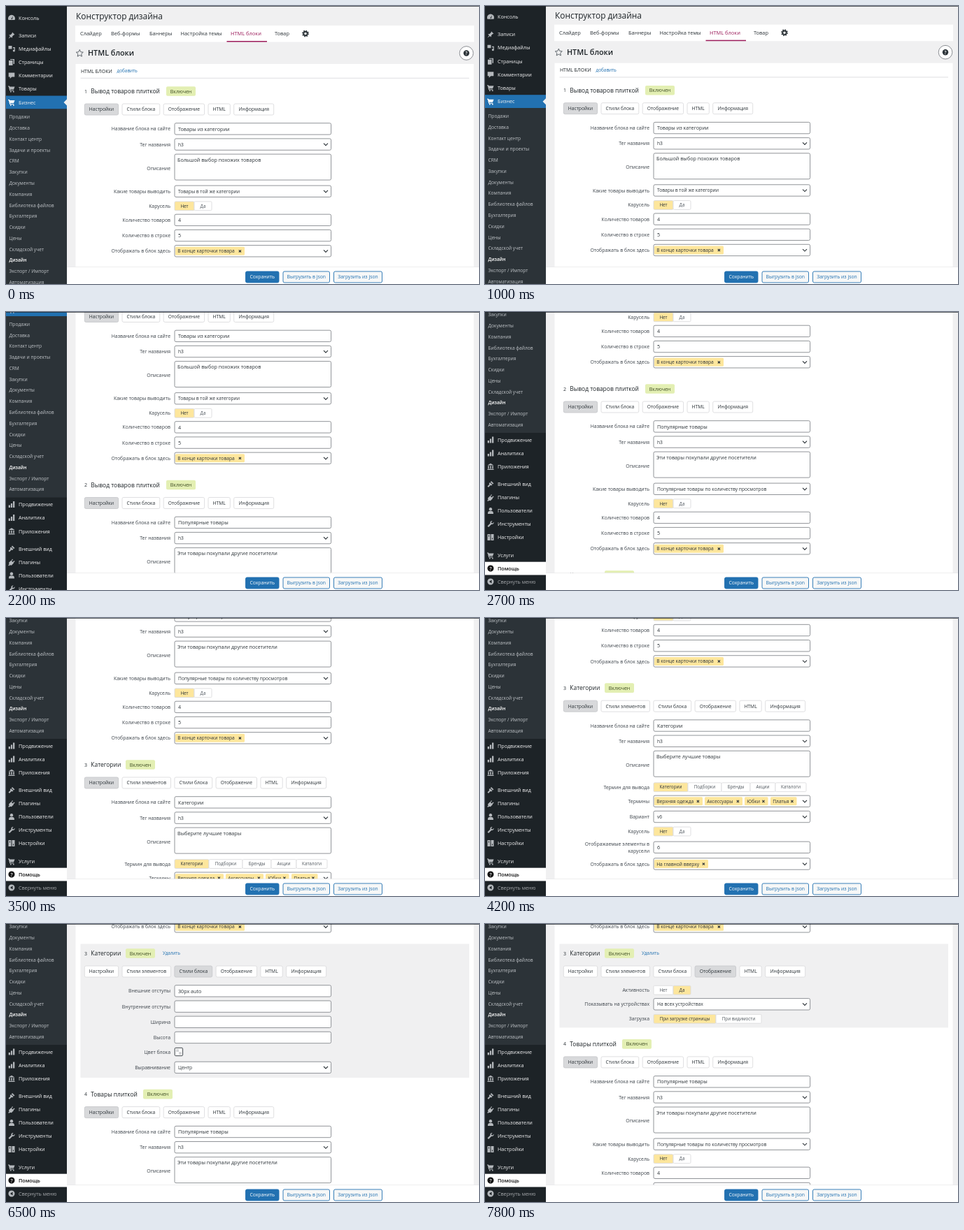
Recreate the animation shown at these times as an HTML page. Size 676x398 px, loop 8 s.

```html
<!DOCTYPE html>
<html lang="ru">
<head>
<meta charset="utf-8">
<title>Конструктор дизайна</title>
<style>
html, body { margin: 0; width: 100%; height: 100%; overflow: hidden; background: #f0f0f1; }
svg { display: block; width: 676px; height: 398px; font-family: "Open Sans", "Noto Sans", sans-serif; }
</style>
</head>
<body>
<svg viewBox="0 0 676 398">
  <g id="page"></g>
  <g id="footer"></g>
  <rect width="87" height="398" fill="#1d2327"/>
  <g id="menu"></g>
  <rect width="676" height="1" fill="#1d2327" opacity=".7"/>
</svg>
<script>
const INK = '#2c3338', BLUE = '#2271b1', LINE = '#dcdcde', YELLOW = '#fde69c';
const byId = id => document.getElementById(id);

// y is the middle of the line
const text = (x, y, s, size = 7, fill = INK, extra = '') =>
  `<text x="${x}" y="${y + size * .36}" font-size="${size}" fill="${fill}" ${extra}>${s}</text>`;
const END = 'text-anchor="end"', MID = 'text-anchor="middle"', BOLD = 'font-weight="600"';
const rect = (x, y, w, h, fill, stroke = 'none', r = 0) =>
  `<rect x="${x}" y="${y}" width="${w}" height="${h}" rx="${r}" fill="${fill}" stroke="${stroke}" stroke-width=".9"/>`;
const path = (d, x, y, fill, stroke = 'none', width = 1) =>
  `<path d="${d}" transform="translate(${x} ${y})" fill="${fill}" stroke="${stroke}" stroke-width="${width}"/>`;
const circle = (x, y, r, fill, stroke = 'none') =>
  `<circle cx="${x}" cy="${y}" r="${r}" fill="${fill}" stroke="${stroke}"/>`;

/* ---- side menu ---- */
const icons = {
  gauge: 'M-4.5 3a5 5 0 1 1 9 0zM-.6 1.6l2.6-4-1.2 4.6z',
  pin: 'M1-4.5l3.5 3.5-1.5.4-2 2 0 2.4-2-1.6-3.5 2.6 2.4-3.6-1.7-1.9h2.4l2-2z',
  media: 'M-4.5-4h5v4.5h-5zM2-2h2.8v5a1.5 1.5 0 1 1-1.1-1.4v-2h-1.7z',
  pages: 'M-4-2.5h5.5v7h-5.5zM-2-4.5h6v7h-1.5v-6h-4.5z',
  comment: 'M-4.3-4h8.6v6h-4l-2.6 2.6v-2.6h-2z',
  cart: 'M-5-4h2l.5 1h7l-1.5 4h-5l.3 1h5v1h-6l-1.5-6h-.8zM-2 3.4h1.6v1.5h-1.6zM2 3.4h1.6v1.5h-1.6z',
  bars: 'M-4.3 1h2.3v3.5h-2.3zM-1.1-1.5h2.2v6h-2.2zM2-4.5h2.3v9h-2.3z',
  building: 'M-4.5-2l4.5-2.7 4.5 2.7zM-3.8-1.2h1.6v4h-1.6zM-.8-1.2h1.6v4h-1.6zM2.2-1.2h1.6v4h-1.6zM-4.5 3.3h9v1.2h-9z',
  brush: 'M1-4.5l3.5 3.5-1.6 1-3-3zM-1-2.5l3.5 3.3-1.5 1.3-1.4-.6-2.6 3-1.5-1.5 2.8-2.8-.6-1.3z',
  plug: 'M1-4.6l1 1-2 2 1.6 1.6 2-2 1 1-2 2 .4.6-3.2 3.2-2-.6-1.6 1.4-1-1 1.4-1.6-.6-2 3.2-3.2.5.3z',
  person: 'M0-4.5a2.3 2.3 0 1 1-.1 0zM-4 4.5c0-4 1.5-4 4-4s4 0 4 4z',
  wrench: 'M-4.5 3l4-4c-.6-2.5 1.2-4 3.2-3.5l-1.7 1.8.4 1.4 1.4.3 1.7-1.7c.6 2.2-1.2 3.7-3.4 3.2l-4 4z',
  sliders: 'M-4.5-4.5h4v9h-4zM.5-4.5h4v9h-4zM-3-3v2h1v-2zM2 1v2h1v-2z',
  help: 'M0-4.5a4.5 4.5 0 1 1-.1 0z',
  fold: 'M0-4.5a4.5 4.5 0 1 1-.1 0zM1.5-2.5l-3.5 2.5 3.5 2.5z'
};
const items = [
  [17, 'gauge', 'Консоль'], [42, 'pin', 'Записи'], [61, 'media', 'Медиафайлы'], [80.5, 'pages', 'Страницы'],
  [99.5, 'comment', 'Комментарии'], [118.5, 'cart', 'Товары'], [138, 'cart', 'Бизнес'],
  [417, 'bars', 'Продвижение'], [436, 'bars', 'Аналитика'], [455.5, 'building', 'Приложения'],
  [480.5, 'brush', 'Внешний вид'], [499.5, 'plug', 'Плагины'], [518.5, 'person', 'Пользователи'],
  [537.5, 'wrench', 'Инструменты'], [556.5, 'sliders', 'Настройки'], [582.5, 'cart', 'Услуги'],
  [601, 'help', 'Помощь'], [620, 'fold', 'Свернуть меню']
];
const subItems = ['Продажи', 'Доставка', 'Контакт центр', 'Задачи и проекты', 'CRM', 'Закупки', 'Документы',
  'Компания', 'Библиотека файлов', 'Бухгалтерия', 'Скидки', 'Цены', 'Складской учет', 'Дизайн',
  'Экспорт / Импорт', 'Автоматизация'];

function menu() {
  let out = rect(0, 128.5, 87, 19, BLUE) + path('M0-4.5v9l-4.5-4.5z', 87, 138, '#f0f0f1') +
    rect(0, 147.5, 87, 259.5, '#2c3338') + rect(0, 591.7, 87, 18.8, '#fff');
  for (const [y, icon, name] of items) {
    const help = icon == 'help', fold = icon == 'fold';
    const color = help ? '#111' : fold ? '#a7aaad' : '#f0f0f1';
    out += path(icons[icon], 8, y, help ? '#111' : name == 'Бизнес' ? '#fff' : '#b4b8bc', 'none', 1)
      .replace('<path', '<path fill-rule="evenodd"') +
      text(18, y, name, 7.2, color, help ? BOLD : '');
    if (help) out += text(8, y, '?', 7, '#fff', MID + BOLD);
  }
  subItems.forEach((name, i) => {
    const on = name == 'Дизайн';
    out += text(4.5, 159 + i * 15.77, name, on ? 6.5 : 6.65, on ? '#fff' : '#bfc3c7', on ? BOLD : '');
  });
  return out;
}

/* ---- form rows ---- */
const heights = { input: 22.2, select: 22.2, tags: 22.2, area: 45, toggle: 18.9, color: 20.7, tall: 26.4 };
const box = (y, h = 16.4) => rect(241, y, 223.6, h, '#fff', '#85888d', 2);
const chevron = y => path('M-3-1.5l3 3 3-3', 457, y, 'none', INK, 1.1);

const draw = {
  input: (y, v) => box(y) + text(246, y + 8.3, v, 7.2),
  tall: (y, v) => box(y + 2.7) + text(246, y + 11, v, 7.2),
  select: (y, v) => box(y) + text(246, y + 8.3, v, 6.7) + chevron(y + 8.3),
  area: (y, v) => box(y, 37) + text(245, y + 8, v, 7.2),
  toggle(y, [on, ...options]) {
    let x = 241, out = '';
    options.forEach(([name, w], i) => {
      out += rect(x, y + .6, w, 12.8, i == on ? YELLOW : '#fff', LINE, 1.5) +
        text(x + w / 2, y + 7, name, 6.3, i == on ? INK : '#50575e', MID);
      x += w;
    });
    return out;
  },
  tags: (y, list) => box(y) + chevron(y + 8.3) + list.map(([name, x, w]) =>
    rect(x, y + 2.2, w, 12, YELLOW, 'none', 1.5) + text(x + 3.2, y + 8.3, name, 6.7) +
    path('M-1.6-1.6l3.2 3.2m0-3.2l-3.2 3.2', x + w - 6.6, y + 8.3, 'none', INK, 1.1)).join(''),
  color: y => rect(241.2, y + .8, 11.4, 11.4, '#fff', INK, 1.5) +
    rect(243, y + 2.6, 4, 4, '#d5d6d8') + rect(247, y + 6.6, 4, 4, '#d5d6d8')
};

const yesNo = on => [on, ['Нет', 28], ['Да', 25]];
const endTag = [['В конце карточки товара', 242, 99]];
const head = (name, about) => [
  ['input', 'Название блока на сайте', name], ['select', 'Тег названия', 'h3'], ['area', 'Описание', about]];
const goods = (name, about, what) => [
  ...head(name, about), ['select', 'Какие товары выводить', what], ['toggle', 'Карусель', yesNo(0)],
  ['input', 'Количество товаров', '4'], ['input', 'Количество в строке', '5'],
  ['tags', 'Отображать в блок здесь', endTag]];
const popular = goods('Популярные товары', 'Эти товары покупали другие посетители',
  'Популярные товары по количеству просмотров');

const styles = [
  ['input', 'Внешние отступы', '30px auto'], ['input', 'Внутренние отступы', ''], ['input', 'Ширина', ''],
  ['input', 'Высота', ''], ['color', 'Цвет блока'], ['select', 'Выравнивание', 'Центр']];
const panes = [
  [...head('Категории', 'Выберите лучшие товары'),
    ['toggle', 'Термин для вывода',
      [0, ['Категории', 49], ['Подборки', 48], ['Бренды', 41], ['Акции', 36], ['Каталоги', 44]]],
    ['tags', 'Термины',
      [['Верхняя одежда', 242, 69], ['Аксессуары', 314, 54], ['Юбки', 371, 33.5], ['Платья', 408, 37.5]]],
    ['select', 'Вариант', 'v6'], ['toggle', 'Карусель', yesNo(0)],
    ['tall', 'Отображаемые элементы в|карусели', '6'],
    ['tags', 'Отображать в блок здесь', [['На главной вверху', 242, 77]]]],
  styles.slice(1),
  styles,
  [['toggle', 'Активность', yesNo(1)], ['select', 'Показывать на устройствах', 'На всех устройствах'],
    ['toggle', 'Загрузка', [0, ['При загрузке страницы', 89], ['При видимости', 65]]]]
];

const tabWidths = { 'Настройки': 48.3, 'Стили элементов': 69.5, 'Стили блока': 53.8, 'Отображение': 58.4, HTML: 31.3, 'Информация': 57 };
const goodsTabs = Object.keys(tabWidths).filter(t => t != 'Стили элементов');

function block(y, n, title, badgeX, rows, tabs, active, hover) {
  let out = text(112, y, n, 7) + text(121.3, y, title, 8.45, '#1d2327', 'font-weight="500"') +
    rect(badgeX, y - 6.8, 42, 13.6, '#e3efb3', 'none', 2) + text(badgeX + 21, y, 'Включен', 7, '#3f4d25', MID);
  if (hover) out += text(224, y, 'Удалить', 6.3, BLUE);
  let x = 112.3, top = y + 45.7;
  tabs.forEach((name, i) => {
    const w = tabWidths[name], on = i == active;
    out += rect(x, y + 18, w, 16, on ? '#d8d9db' : '#fff', on ? '#c8c9cc' : LINE, 2) +
      text(x + w / 2, y + 26, name, 6.75, INK, MID);
    x += w + 5.4;
  });
  for (const [kind, label, value] of rows) {
    const mid = { toggle: 7, color: 7, tall: 11, area: 20 }[kind] || 8.3;
    const lines = label.split('|');
    lines.forEach((s, i) => out += text(235, top + mid + (i - (lines.length - 1) / 2) * 10, s, 6.9, '#3c434a', END));
    out += draw[kind](top, value);
    top += heights[kind];
  }
  const next = top + 24.2;
  if (hover) out = rect(106.5, y - 13.5, 555.5, next - 23.5 - (y - 13.5), '#f0f0f1') + out;
  return [out, next];
}

function page(tab) {
  let out = text(100, 15, 'Конструктор дизайна', 11.9, '#1d2327') + rect(99, 28, 570, 23.5, '#fff');
  [[106, 'Слайдер'], [150, 'Веб-формы'], [205, 'Баннеры'], [249.5, 'Настройка темы'], [321, 'HTML блоки'], [384, 'Товар']]
    .forEach(([x, s]) => out += text(x, 39.5, s, 7.45, s[0] == 'H' ? '#9b1b5a' : INK));
  out += rect(315.5, 50, 57.5, 1.5, '#9b1b5a');
  out += `<circle cx="428" cy="39.5" r="4.1" fill="none" stroke="${INK}" stroke-width="1.6" stroke-dasharray="1.6 1.62"/>` +
    `<circle cx="428" cy="39.5" r="2.7" fill="none" stroke="${INK}" stroke-width="1.9"/>`;
  out += path('M0-5l1.5 3.3 3.5.4-2.6 2.4.7 3.6-3.1-1.8-3.1 1.8.7-3.6-2.6-2.4 3.5-.4z', 105.3, 67.5, 'none', '#50575e', .9) +
    text(117, 67.5, 'HTML блоки', 10.8, '#1d2327', BOLD) +
    circle(658, 67.5, 9.8, '#fff', '#8c8f94') + circle(658, 67.5, 4.2, INK) + text(658, 67.5, '?', 6.5, '#fff', MID + BOLD);
  out += rect(99.5, 83, 569, 1200, '#fff') + text(107, 93, 'HTML БЛОКИ', 6.95, '#1d2327', 'font-weight="500"') +
    text(158.5, 93, 'добавить', 6.4, BLUE) + rect(106.5, 102.8, 555.5, .9, LINE);

  let y = 122;
  const add = (...args) => { const [s, next] = block(y, ...args); out += s; y = next; };
  add(1, 'Вывод товаров плиткой', 229,
    goods('Товары из категории', 'Большой выбор похожих товаров', 'Товары в той же категории'), goodsTabs, 0);
  add(2, 'Вывод товаров плиткой', 229, popular, goodsTabs, 0);
  add(3, 'Категории', 171, panes[tab], Object.keys(tabWidths), tab, tab > 0);
  add(4, 'Товары плиткой', 196, popular, goodsTabs, 0);
  return out;
}

byId('menu').innerHTML = menu();
byId('footer').innerHTML = rect(87, 373.6, 589, 25, '#fff') + rect(87, 373.4, 589, .7, '#e4e4e6') +
  [[342.5, 47.5, 'Сохранить', BLUE, '#fff'], [396, 66.5, 'Выгрузить в json', '#f6f7f7', BLUE],
   [468.5, 69, 'Загрузить из json', '#f6f7f7', BLUE]].map(([x, w, s, fill, ink]) =>
    rect(x, 380, w, 16, fill, BLUE, 2) + text(x + w / 2, 388, s, 6.8, ink, MID)).join('');

/* ---- motion ---- */
const scrolls = [[950, 1500, 56], [1850, 2680, 223], [2720, 3480, 167], [3620, 4580, 168]];
const ease = p => p * p * (3 - 2 * p);
const clamp = p => Math.max(0, Math.min(1, p));
let shown = -1;

function frame(now) {
  const t = Math.floor(now % 8000 / 100) * 100;
  const y = scrolls.reduce((sum, [a, b, d]) => sum + d * ease(clamp((t - a) / (b - a))), 0);
  const tab = [5300, 6400, 7700].filter(at => t >= at).length;
  if (tab != shown) byId('page').innerHTML = page(shown = tab);
  byId('page').setAttribute('transform', `translate(0 ${-y})`);
  byId('menu').setAttribute('transform', `translate(0 ${-Math.min(y, 234)})`);
}

const start = performance.now();
(function loop() {
  frame(performance.now() - start);
  requestAnimationFrame(loop);
})();
</script>
</body>
</html>
```
